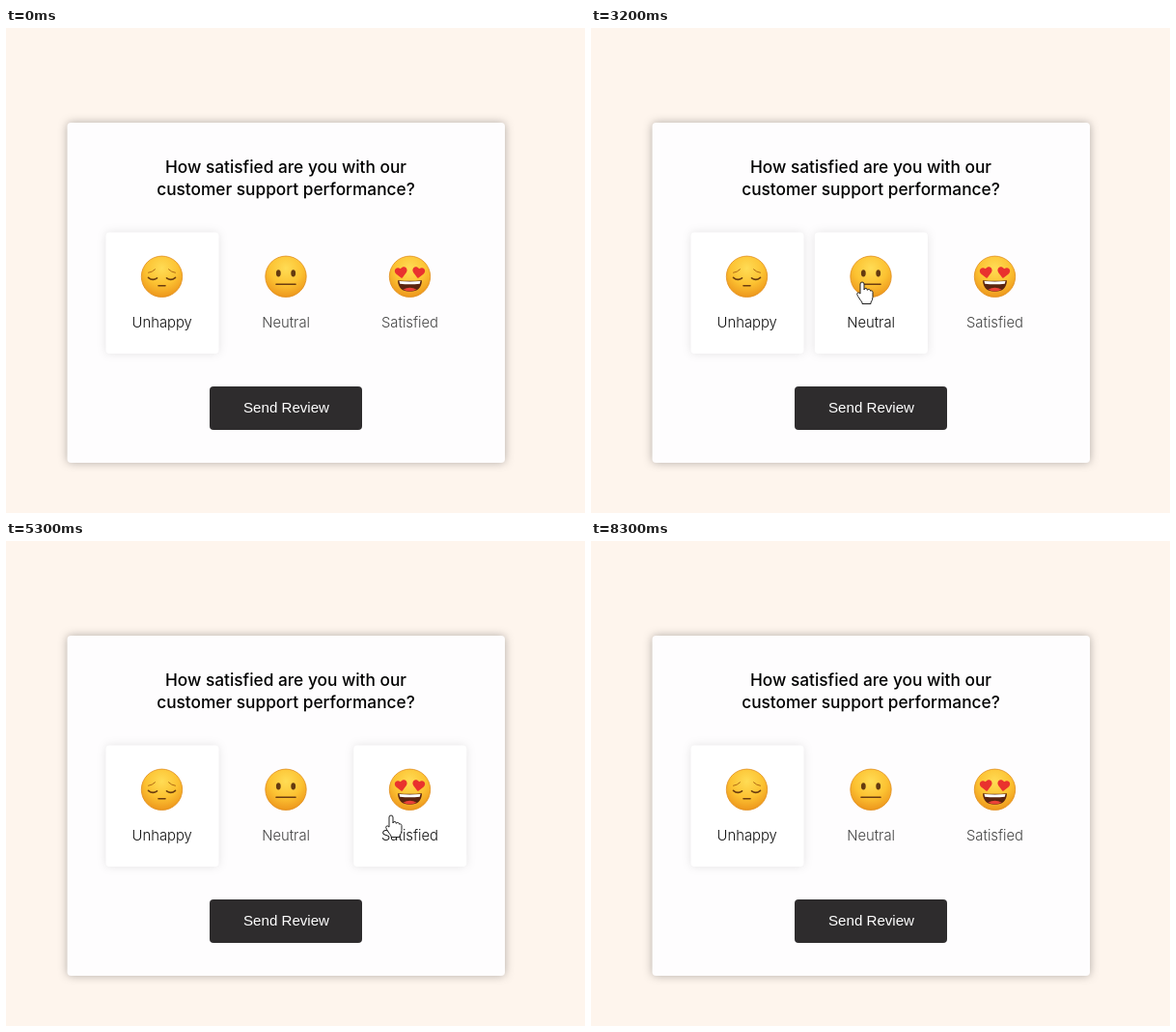
Recreate the animation shown at these times as an HTML page. Size 600x502 px, loop 8600 ms.

```html
<!DOCTYPE html>
<html lang="en">
<head>
<meta charset="utf-8">
<title>Feedback form</title>
<style>
html, body { margin: 0; width: 100%; height: 100%; overflow: hidden; background: #fef5ed; }
svg { display: block; width: 600px; height: 502px; }
text { font-family: Montserrat, Inter, sans-serif; text-anchor: middle; }
.strong { font-size: 16.9px; font-weight: 500; }
.title { font-size: 17.3px; }
.body { font-size: 17.4px; font-weight: 300; fill: #111; }
.label { font-size: 14.8px; font-weight: 300; fill: #444; }
.on .label { fill: #111; }
.panel { fill: #fefdfe; filter: drop-shadow(0 0 5px rgba(0, 0, 0, .3)); }
.tile { fill: #fff; filter: drop-shadow(0 0 5px rgba(0, 0, 0, .1)); visibility: hidden; }
.on .tile { visibility: inherit; }
.button text { font: 15.1px "Liberation Sans", Arial, sans-serif; fill: #fff; }
.line { fill: none; stroke: #6b3d10; stroke-width: 1.6; stroke-linecap: round; }
.brow { stroke: #b06a14; stroke-width: 1; }
.cursor { fill: #fff; stroke: #222; stroke-width: 1; stroke-linejoin: round; }
</style>
</head>
<body>
<svg viewBox="0 0 600 502">
  <defs>
    <radialGradient id="skin" cx=".5" cy=".3" r=".72">
      <stop offset="0" stop-color="#ffdc55"/>
      <stop offset=".55" stop-color="#fcc232"/>
      <stop offset="1" stop-color="#ec941b"/>
    </radialGradient>
    <path id="heart" transform="translate(-256 -256)" d="M462.3 62.6C407.5 15.9 326 24.3 275.7 76.2L256 96.5l-19.7-20.3C186.1 24.3 104.5 15.9 49.7 62.6c-62.8 53.6-66.1 149.8-9.9 207.9l193.5 199.8c12.5 12.9 32.8 12.9 45.3 0l193.5-199.8c56.3-58.1 53-154.3-9.8-207.9z"/>
  </defs>

  <g id="form">
    <rect class="panel" x="63.5" y="98" width="453.5" height="352" rx="4"/>
    <text class="strong title" x="290" y="149.5">How satisfied are you with our</text>
    <text class="strong title" x="290" y="172.5">customer support performance?</text>
    <g id="ratings"></g>
    <g class="button" id="button">
      <rect x="211" y="371" width="158" height="45" rx="4" fill="#2e2c2d"/>
      <text x="290.5" y="398">Send Review</text>
    </g>
  </g>

  <g id="thanks">
    <rect class="panel" x="63.5" y="149.5" width="453.5" height="251" rx="4"/>
    <use href="#heart" fill="#f00" transform="translate(290.2 198.5) scale(.0672)"/>
    <text class="strong" x="290" y="245">Thank You!</text>
    <text class="strong" x="290" y="287.5" id="result"></text>
    <text class="body" x="290" y="325.5">We'll use your feedback to improve our</text>
    <text class="body" x="290" y="345.5">customer support</text>
  </g>

  <path class="cursor" id="cursor"/>
</svg>

<script>
const LOOP = 8600, STEP = 100;
const $ = id => document.getElementById(id);
const show = (el, on) => el.setAttribute("visibility", on ? "visible" : "hidden");

const ARROW = "M.5.5v14.8l3.4-3.2 2.3 5.1 2.3-1-2.3-5.1h4.4z";
const HAND = "M-2 2a2 2 0 0 1 4 0v6a1.7 1.7 0 0 1 3.4 .4a1.7 1.7 0 0 1 3.2 .8a1.5 1.5 0 0 1 2.4 1.2v5q0 3-2 5.6v1.5h-9v-1.5q-2-2.5-4.5-6.5q-1.6-2.6-.2-3.4t2.7 1z";

// Face features, relative to the face centre
const loveEye = (x, tilt) =>
  `<use href="#heart" fill="#e9322e" transform="translate(${x} -4) rotate(${tilt}) scale(.025)"/>`;
const ratings = [
  ["Unhappy", `<path class="line" d="M-14 1q4.5 4 9 .5M14 1q-4.5 4-9 .5M-3.5 9.5h7"/>
    <path class="line brow" d="M-14-4q4-.5 7-3.5M14-4q-4-.5-7-3.5"/>`],
  ["Neutral", `<g fill="#643a10"><ellipse cx="-7.7" cy="-3.5" rx="2.4" ry="3.6"/>
    <ellipse cx="7.7" cy="-3.5" rx="2.4" ry="3.6"/></g><path class="line" d="M-10 8H10"/>`],
  ["Satisfied", `${loveEye(-9, -8)}${loveEye(9, 8)}
    <path d="M-12.5 4Q0 5 12.5 4Q12 15.5 0 15.5T-12.5 4z" fill="#5a2410"/>
    <path d="M-11 4.8Q0 5.7 11 4.8L10.3 7.4Q0 8.6-10.3 7.4z" fill="#fff"/>
    <path d="M-7 13.4Q0 9.5 7 13.4Q0 17-7 13.4z" fill="#ec4238"/>`],
];
const tileX = i => 103.5 + i * 128.4;
$("ratings").innerHTML = ratings.map(([name, face], i) => `<g>
  <rect class="tile" x="${tileX(i)}" y="211.5" width="117" height="125.5" rx="4"/>
  <g transform="translate(${161.5 + i * 128.5} 257.3)">
    <circle r="21.2" fill="url(#skin)" stroke="#e18d1c" stroke-width=".8"/>${face}
  </g>
  <text class="label" x="${161.7 + i * 128.4}" y="310">${name}</text></g>`).join("");
const tiles = [...$("ratings").children];

// Pointer tracks: time, x, y; hidden outside them
const tracks = [
  [[100, 429, 428], [700, 330, 396], [1300, 318, 394], [1800, 340, 399],
   [2000, 411, 330], [2300, 330, 186], [2600, 202, 228], [3000, 202, 228],
   [3200, 281, 263], [3500, 286, 270], [3800, 290, 394], [4000, 290, 394], [4400, -14, 300]],
  [[4800, 315, 149], [5300, 399, 284], [5600, 402, 285], [6000, 300, 394],
   [6200, 300, 394], [6500, 221, 226], [6800, 584, 33]],
];
// Rounds: picked rating and its time, time sent, time the form returns
const rounds = [
  { result: 2, sent: 1400, back: 3000 },
  { result: 1, picked: 3400, sent: 4000, back: 5000 },
  { result: 2, picked: 5600, sent: 6200, back: 7900 },
];

function pointerAt(t) {
  const track = tracks.find(p => t >= p[0][0] && t <= p[p.length - 1][0]);
  if (!track) return null;
  const i = Math.max(1, track.findIndex(p => p[0] >= t));
  const [t0, x0, y0] = track[i - 1], [t1, x1, y1] = track[i];
  const k = (t - t0) / (t1 - t0);
  return [x0 + (x1 - x0) * k, y0 + (y1 - y0) * k];
}

const inside = (p, x, y, w, h) => p && p[0] >= x && p[0] <= x + w && p[1] >= y && p[1] <= y + h;

function draw(now) {
  const t = Math.floor(now % LOOP / STEP) * STEP;
  const pointer = pointerAt(t);
  const round = rounds.find(r => t < r.back);
  const done = !!round && t >= round.sent;
  const active = round && t >= round.picked ? round.result : 0;
  const hover = tiles.findIndex((_, i) => inside(pointer, tileX(i), 211.5, 117, 125.5));
  const overButton = inside(pointer, 211, 371, 158, 45);

  show($("form"), !done);
  show($("thanks"), done);
  if (done) $("result").textContent = "Feedback: " + ratings[round.result][0];
  tiles.forEach((el, i) => el.classList.toggle("on", i === active || i === hover));

  const pressed = round && t === round.sent - STEP;
  $("button").setAttribute("transform", pressed ? "translate(290 393.5) scale(.98) translate(-290 -393.5)" : "");

  show($("cursor"), !!pointer);
  if (pointer) {
    $("cursor").setAttribute("d", !done && (hover >= 0 || overButton) ? HAND : ARROW);
    $("cursor").setAttribute("transform", `translate(${pointer})`);
  }
}

const start = performance.now();
function tick() {
  draw(performance.now() - start);
  requestAnimationFrame(tick);
}
tick();
</script>
</body>
</html>
```
